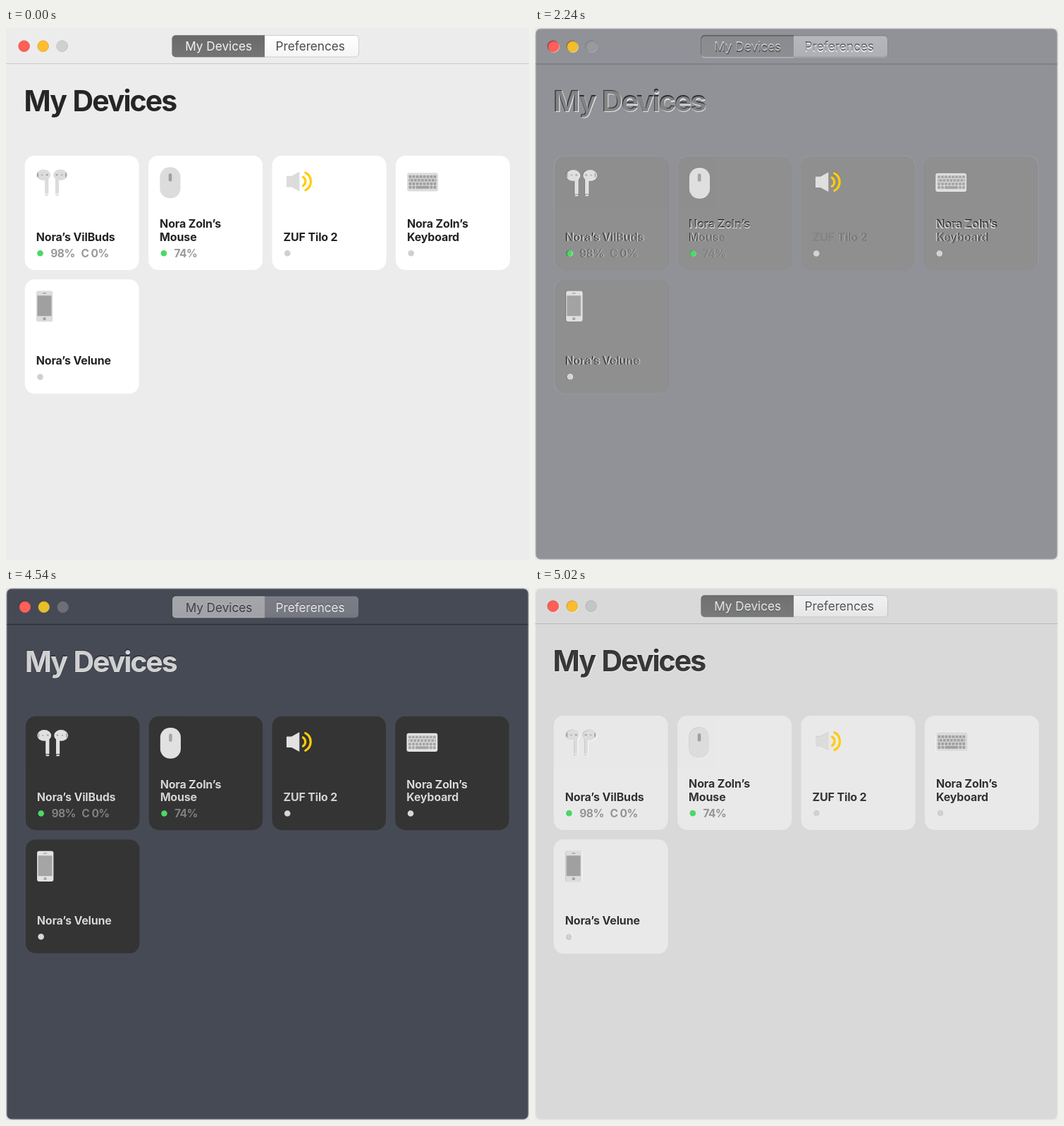
Recreate the animation shown at these times as an HTML page. Size 742 px wide and 754 px high, loop 5.08 s.

```html
<!DOCTYPE html>
<html lang="en">
<head>
<meta charset="utf-8">
<title>My Devices</title>
<style>
  html, body { margin: 0; width: 100%; height: 100%; overflow: hidden; background: #ececec; }
  svg { position: absolute; left: 0; top: 0; width: 742px; height: 754px; }
  text { font-family: Inter, "Open Sans", sans-serif; font-optical-sizing: none; white-space: pre; }
  .heading { font-size: 41px; font-weight: 700; letter-spacing: -2px; word-spacing: 2px; }
  .tab { font-size: 17.2px; }
  .label { font-size: 16px; font-weight: 700; letter-spacing: -.15px; }
  .value { font-size: 15.6px; font-weight: 700; letter-spacing: -.55px; }
</style>
</head>
<body>
<script>
const W = 742, H = 754, LOOP = 5080;

const light = {
  id: "light", fit: "",
  bg: "#ececec", line: "#cbcbcb", heading: "#262626", label: "#232323", value: "#999",
  card: "#fff", icon: "#dcdcdc", detail: "#a0a0a0", off: "#d0d0d0",
  yellow: "#febd2f", idle: "#d0d0d0", idleEdge: "#bcbcbc",
  tabOn: ["#696969", "#757575"], tabOff: ["#fff", "#f5f5f5"], tabEdge: "#cdcdcd",
  textOn: "#f2f2f2", textOff: "#4b4b4b"
};

const dark = {
  id: "dark", fit: "translate(1.3 1.3) scale(.9966)",
  bg: "#343844", line: "#14161b", heading: "#e3e3e3", label: "#e6e6e6", value: "#7c7c7c",
  card: "#1e1e1e", icon: "#e2e2e2", detail: "#a6a6a6", off: "#d9d9d9",
  yellow: "#e6c029", idle: "#62656e", idleEdge: "#62656e",
  tabOn: ["#abadb2", "#a6a8ae"], tabOff: ["#6d707a", "#666973"], tabEdge: "none",
  textOn: "#30333d", textOff: "#ececee"
};

const devices = [
  { icon: earbuds, name: ["Nora’s VilBuds"], values: [[36.6, "98%"], [79.7, "C 0%"]] },
  { icon: mouse, name: ["Nora Zoln’s", "Mouse"], values: [[36.4, "74%"]] },
  { icon: speaker, name: ["ZUF Tilo 2"] },
  { icon: keyboard, name: ["Nora Zoln’s", "Keyboard"] },
  { icon: phone, name: ["Nora’s Velune"] }
];

const rect = (x, y, w, h, r, fill, more = "") =>
  `<rect x="${x}" y="${y}" width="${w}" height="${h}" rx="${r}" fill="${fill}" ${more}/>`;
const circle = (x, y, r, fill, more = "") =>
  `<circle cx="${x}" cy="${y}" r="${r}" fill="${fill}" ${more}/>`;
const path = (d, fill, more = "") => `<path d="${d}" fill="${fill}" ${more}/>`;
const text = (x, y, kind, fill, str) =>
  `<text x="${x}" y="${y}" class="${kind}" fill="${fill}">${str}</text>`;

// Icons are drawn relative to the top left corner of their card.
function earbuds(c) {
  const bud = `<ellipse cx="26.4" cy="27.3" rx="10" ry="7.8" fill="${c.icon}"/>`
    + path("M28.4 30h5.2v23.8h-5.2z", c.icon)
    + rect(28.6, 54.8, 4.8, 1.9, .8, c.icon)
    + `<ellipse cx="18.4" cy="27.3" rx="1" ry="3.4" fill="${c.detail}"/>`
    + rect(23.2, 26.5, 2.4, 1.6, .8, c.detail) + rect(30, 26, 3, 2.2, 1, c.detail);
  return bud + `<g transform="translate(76.8 0) scale(-1 1)">${bud}</g>`;
}

function mouse(c) {
  return rect(16.2, 16.3, 29.2, 44, 14, c.icon) + rect(28.6, 25, 4.6, 11.4, 2.2, c.detail);
}

function speaker(c) {
  const wave = d => path(d, "none", 'stroke="#ffcc0a" stroke-width="3.2" stroke-linecap="round"');
  return path("M21.5 28.8h6.2l11.2-6.2v28l-11.2-6.2h-6.2q-1 0-1-1v-13.6q0-1 1-1z", c.icon)
    + wave("M44 30.2a7.4 7.4 0 0 1 0 12.4") + wave("M47.4 24a14 14 0 0 1 0 24.8");
}

function keyboard(c) {
  let out = rect(16.2, 24.2, 44, 26.4, 3, c.icon);
  const key = (x, row, w = 3.9) => rect(x, 27.8 + row * 5, w, 3.9, .7, c.detail);
  for (let row = 0; row < 3; row++) {
    const shift = row % 2 * 2.4;
    for (let i = 0; i < 8 - row % 2; i++) out += key(18.6 + shift + i * 5, row);
    if (row % 2) out += key(18.6, row, 1.5) + key(56, row, 1.6);
  }
  return out + key(18.6, 3) + key(23.6, 3) + key(28.6, 3, 18.9) + key(48.6, 3) + key(53.6, 3);
}

function phone(c) {
  return rect(16.2, 16.3, 23.4, 43.6, 3, c.icon)
    + rect(17.8, 23, 20, 29, .5, c.detail)
    + rect(25.4, 18.9, 5, 1.6, .8, c.detail)
    + circle(27.9, 55.9, 2.1, c.detail);
}

function card(d, i, c) {
  const x = 26.7 + i % 4 * 175.4;
  const y = 181 + Math.floor(i / 4) * 175.3;
  const values = d.values || [];
  const first = 121.2 - (d.name.length - 1) * 18.8;
  return `<g transform="translate(${x} ${y})">`
    + rect(0, 0, 162, 162, 14, c.card)
    + d.icon(c)
    + d.name.map((s, n) => text(16, first + n * 18.8, "label", c.label, s)).join("")
    + circle(21.8, 138.3, 4.3, values.length ? "#4cd964" : c.off)
    + values.map(([vx, s]) => text(vx, 144, "value", c.value, s)).join("")
    + "</g>";
}

function gradient(id, [top, bottom]) {
  return `<linearGradient id="${id}" x2="0" y2="1"><stop stop-color="${top}"/>`
    + `<stop offset="1" stop-color="${bottom}"/></linearGradient>`;
}

function tabs(c) {
  const on = c.id + "On", off = c.id + "Off";
  return `<defs>${gradient(on, c.tabOn)}${gradient(off, c.tabOff)}</defs>`
    + rect(235.7, 10.5, 264.8, 30.5, 5, `url(#${off})`, `stroke="${c.tabEdge}"`)
    + path("M367 10.3V41.2H240.5a5 5 0 0 1-5-5V15.3a5 5 0 0 1 5-5z", `url(#${on})`)
    + text(254.2, 32.4, "tab", c.textOn, "My Devices")
    + text(382.6, 32.4, "tab", c.textOff, "Preferences");
}

function lights(c) {
  const light = (x, fill, edge) => circle(x, 25.7, 7.8, fill, `stroke="${edge}" stroke-width=".8"`);
  return light(25.6, "#fe5f57", "#e8504a") + light(52.6, c.yellow, "#dba92c")
    + light(79.6, c.idle, c.idleEdge);
}

function scene(c) {
  const frame = c.fit
    ? rect(0, 0, W, H, 0, "#e4e4e4") + rect(1, 1, W - 2, H - 2, 7, c.bg, 'stroke="#858990"')
    : rect(0, 0, W, H, 0, c.bg);
  return `<svg id="${c.id}" viewBox="0 0 ${W} ${H}">${frame}<g transform="${c.fit}">`
    + rect(0, 50, W, 1.1, 0, c.line)
    + lights(c) + tabs(c)
    + text(25.6, 118, "heading", c.heading, "My Devices")
    + devices.map((d, i) => card(d, i, c)).join("")
    + "</g></svg>";
}

document.body.innerHTML = scene(light) + scene(dark);

// Each fade jumps by a tenth every 60 ms.
const fades = [
  [0, 0, "step-end"],
  [2000, .1, "steps(9, end)"],
  [2540, 1, "step-end"],
  [4540, .9, "steps(9, end)"],
  [LOOP, 0, "linear"]
];
document.getElementById("dark").animate(
  fades.map(([at, opacity, easing]) => ({ offset: at / LOOP, opacity, easing })),
  { duration: LOOP, iterations: Infinity }
);
</script>
</body>
</html>
```
